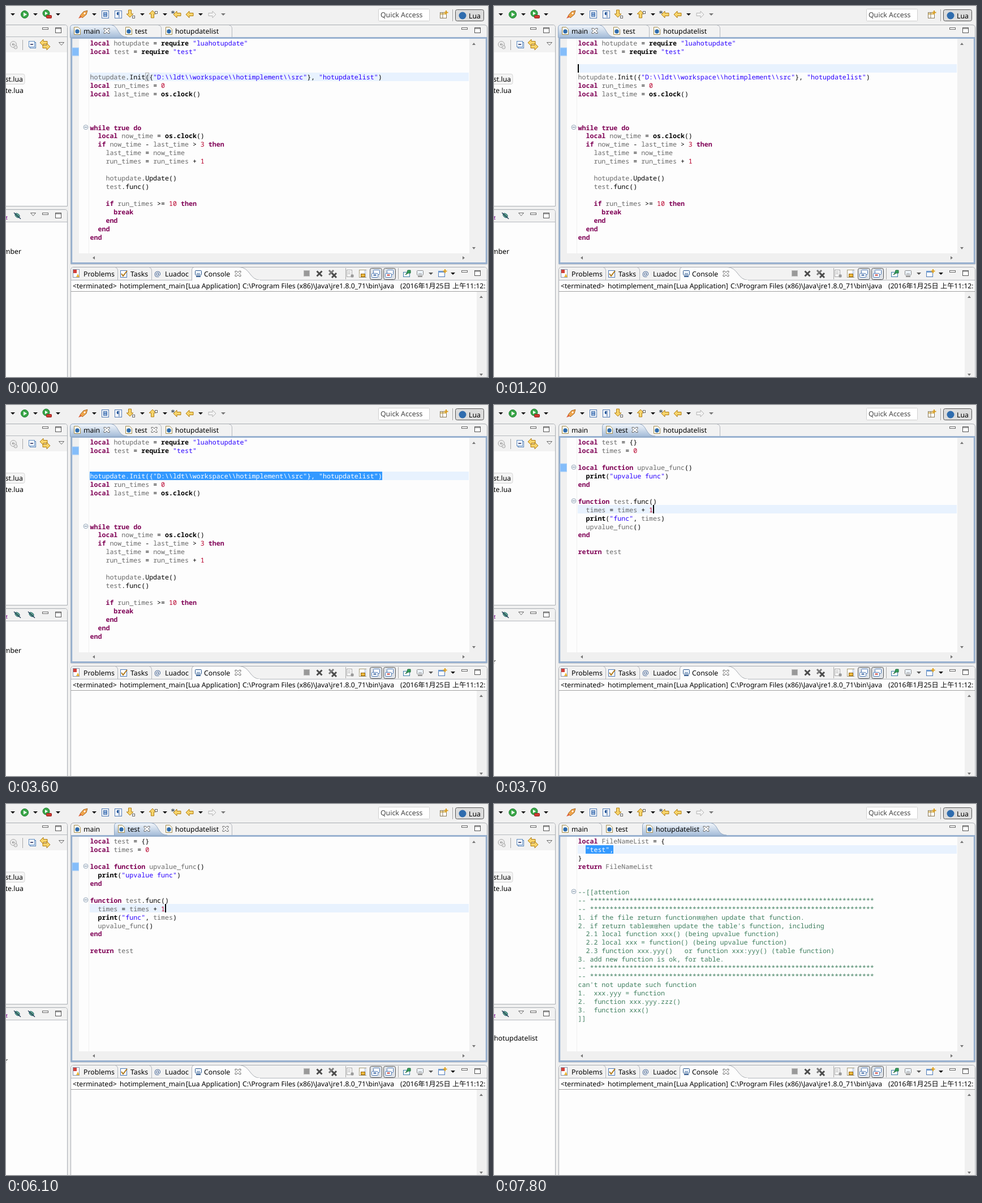
These frames come from a looping animation (852 px wide and 657 px high, 8 s). An HTML page:

```html
<!DOCTYPE html>
<html lang="en">
<head>
<meta charset="utf-8">
<title>Editor tabs</title>
<style>
html, body { margin: 0; width: 100%; height: 100%; overflow: hidden; background: #f0f0f0; }
svg { display: block; }
text { white-space: pre; text-rendering: geometricPrecision; }
.ui { font: 12.3px "Noto Sans", "Noto Sans CJK SC", "Open Sans", sans-serif; fill: #000; }
.code { font: 11.633px "Noto Sans Mono", "DejaVu Sans Mono", monospace; fill: #000; }
.cjk { font-size: 8.3px; font-family: "Noto Sans CJK SC", "Noto Sans CJK", sans-serif; }
.k { fill: #7f0055; font-weight: bold; }
.b { font-weight: bold; }
.s { fill: #2a00ff; }
.n { fill: #b8002c; }
.v { fill: #6a6a6a; }
.c { fill: #3f7f5f; }
.sel, .sel tspan { fill: #fff; }
</style>
</head>
<body>
<svg id="stage" width="852" height="657" viewBox="0 0 852 657"></svg>
<script>
const LOOP = 8000, X0 = 148.5, CW = 6.98, LH = 14.95;
const BAR = '#f2f2f2', EDGE = '#a9adb3', SOFT = '#b4b8be';
const lineY = n => 58.2 + LH * n;
const colX = col => X0 + CW * col;
const esc = s => s.replace(/&/g, '&amp;').replace(/</g, '&lt;').replace(/>/g, '&gt;');

// shape helpers
const rect = (x, y, w, h, fill = 'none', stroke = 'none', r = 0, sw = 1) =>
  `<rect x="${x}" y="${y}" width="${w}" height="${h}" rx="${r}" fill="${fill}" stroke="${stroke}" stroke-width="${sw}"/>`;
const path = (d, fill = 'none', stroke = 'none', sw = 1) =>
  `<path d="${d}" fill="${fill}" stroke="${stroke}" stroke-width="${sw}"/>`;
const disc = (x, y, r, fill, stroke = 'none') =>
  `<circle cx="${x}" cy="${y}" r="${r}" fill="${fill}" stroke="${stroke}"/>`;
const label = (x, y, s, extra = '') => `<text class="ui" x="${x}" y="${y}" ${extra}>${esc(s)}</text>`;
const line = (x1, y1, x2, y2, c, sw = 1) => path(`M${x1} ${y1}L${x2} ${y2}`, 'none', c, sw);

// small icons, placed by centre
const drop = (x, y, c = '#111') => path(`M${x - 4} ${y - 2}h8l-4 4z`, c);
const scrollArrow = (x, y, turn) =>
  `<path d="M-3 2h6l-3 -4z" fill="#777" transform="translate(${x} ${y}) rotate(${turn})"/>`;
const minMax = (x, y) => rect(x - 4.5, y - 4.5, 10, 3, '#fff', '#666') +
  rect(x + 18.5, y - 4.5, 10, 9, '#fff', '#555') + line(x + 18, y - 3, x + 29, y - 3, '#555');
const viewMenu = (x, y) => path(`M${x - 4.5} ${y - 2.5}h9l-4.5 5z`, '#fff', '#666');
const closeX = (x, y) => path(`M${x - 5} ${y - 4.5}h3l2 2.5 2 -2.5h3v2l-2.5 2.5 2.5 2.5v2h-3l-2 -2.5 -2 2.5h-3v-2l2.5 -2.5 -2.5 -2.5z`, '#fff', '#666');
const file = (x, y) => path(`M${x - 5.5} ${y - 6.5}h7l4 4v9h-11z`, '#fffdf2', '#a08a4c') +
  disc(x, y + 1, 3.7, '#2f6cae');
const arrow = (x, y, turn, fill = '#f7d46b', stroke = '#b07c12') =>
  `<path d="M-7 0l6 -6v3.5h7v5h-7v3.5z" fill="${fill}" stroke="${stroke}" transform="translate(${x} ${y}) rotate(${turn})"/>`;
const slashed = (x, y) => `<ellipse cx="${x}" cy="${y}" rx="4.5" ry="3" fill="#63a58c" stroke="#286a70" transform="rotate(40 ${x} ${y})"/>` +
  line(x - 6, y - 5, x + 6, y + 6, '#1c3550', 1.3);
const cross = (x, y, r, c) => path(`M${x - r} ${y - r}l${2 * r} ${2 * r}M${x + r} ${y - r}l${-2 * r} ${2 * r}`, 'none', c, 3);
const monitor = (x, y, c) => rect(x - 5.5, y - 5.5, 11, 8, '#eef5fc', c, 1) + line(x - 3, y, x + 3, y, c) +
  line(x - 4, y + 5, x + 4, y + 5, c, 2);
const fold = n => disc(141, lineY(n) + 7, 4, '#f4f7fa', '#9aaabb') +
  line(138.5, lineY(n) + 7, 143.5, lineY(n) + 7, '#6b7f95');
const grip = (x, y) => line(x, y, x, y + 20, '#a9a9a9');

function mainBar() {
  let s = rect(0, 0, 852, 32, '#f1f1f1');
  [12, 52, 92, 156, 241, 281, 344].forEach(x => s += drop(x, 15));
  s += drop(384, 15, '#777');
  s += disc(33, 15, 6.5, '#3aa648', '#187a2c') + path('M31 11.5l6 3.5 -6 3.5z', '#fff');
  s += disc(71, 13, 6, '#3aa648', '#187a2c') + path('M69 10l5 3 -5 3z', '#fff') +
    rect(71.5, 16.5, 9, 5, '#cf3b32', '#8d1f1f', 1);
  s += path('M144 8l-7 2 -6 7 4 4 7 -6z', '#f0a44a', '#a86a28') + path('M131 17l-3 5 6 -2z', '#e0603a') + disc(139, 13, 1.5, '#fff');
  s += rect(169.5, 8.5, 12, 13, '#fff', '#4d78b4') + rect(172.5, 11.5, 6, 7, '#b9d0ee', '#3263a4') +
    line(173, 14, 178, 14, '#3263a4') + line(173, 16, 178, 16, '#3263a4');
  s += rect(192.5, 8.5, 12, 13, '#fff', '#4d78b4') + label(195, 19, '¶', 'style="fill:#2a5a9c;font-size:11px"');
  s += arrow(219, 13, -90) + rect(223.5, 17.5, 4, 4, '#fff', '#666');
  s += arrow(259, 15, 90) + rect(263.5, 9.5, 4, 4, '#fff', '#666');
  s += arrow(303, 15, 0) + path('M295 8v6M292 9.5l6 3M298 9.5l-6 3', 'none', '#345');
  s += arrow(325, 15, 0) + arrow(364, 15, 180, '#f2f2f2', '#b5b5b5');
  s += rect(658.5, 5.5, 90, 21, '#fff', '#d0d0d0', 1) + label(662, 20, 'Quick Access', 'style="fill:#444"');
  s += rect(767.5, 11.5, 11, 10, '#fff', '#8a7a58') + line(768, 14, 779, 14, '#d7b65a', 2) + line(772, 12, 772, 22, '#8a7a58') +
    path('M778 8v7M774.5 11.5h7', 'none', '#d79a1c', 2);
  s += line(789.5, 6, 789.5, 27, '#a5a5a5');
  s += rect(794.5, 6.5, 50, 20, '#dcdcdc', '#555', 3) + disc(807, 17, 6.5, '#2f6cae') + label(818, 22, 'Lua');
  return s;
}

function leftViews() {
  const panel = (y, h, bar) => path(`M-5 ${y + .5}H104q4.5 0 4.5 5V${y + h + .5}H-5z`, '#fdfdfd', EDGE) +
    path(`M-5 ${y + 1}H104q4 0 4 5V${y + bar}H-5z`, BAR) + line(0, y + bar + .5, 108, y + bar + .5, SOFT);
  let s = panel(33, 321, 21) + rect(0, 55, 108, 27, BAR) + minMax(69, 43);
  s += disc(13, 68, 5.5, '#ededed', '#aaa') + path('M16 68h-5l2 -2M11 68l2 2', 'none', '#888') + disc(17, 73, 3, '#e4e4e4', '#aaa');
  s += line(29.5, 60, 29.5, 78, '#a9a9a9');
  s += rect(42.5, 64.5, 10, 10, '#fff', '#4d7db8') + rect(40.5, 62.5, 10, 10, '#f5faff', '#5c8ac0') + line(43, 68, 48, 68, '#225', 1.5);
  s += arrow(67, 65, 0) + arrow(71, 72, 180) + viewMenu(98, 67);
  s += rect(-5, 120.5, 38, 18, '#f5f5f5', '#d5d5d5', 3) + label(30, 134, 'st.lua', 'text-anchor="end"') +
    label(31, 154, 'te.lua', 'text-anchor="end"');
  s += panel(360, 300, 22) + minMax(69, 371);
  s += label(-2, 378, 'z', 'style="fill:#8a2a9a;font-weight:bold;font-size:10px"') + slashed(20, 371);
  return s;
}

function editorFrame() {
  return path('M114.5 457V39q0 -5.5 5.5 -5.5H845q5.5 0 5.5 5.5V457z', BAR, EDGE) +
    rect(116, 56.5, 733, 399, '#fdfdfd', '#98b1d0', 0, 3) +
    rect(117.5, 58, 11.5, 396, '#f0f0f0') + rect(129, 438, 718, 16, '#f0f0f0') +
    rect(819, 58, 28.5, 396, '#f0f0f0') + line(146.5, 58, 146.5, 438, '#f0f0f0') +
    scrollArrow(827, 67, 0) + scrollArrow(827, 429, 180) + scrollArrow(155, 446, -90) + scrollArrow(809, 446, 90) +
    minMax(810, 43);
}

function consoleView() {
  const y = 474;
  let s = path('M114.5 657V468q0 -5.5 5.5 -5.5H845q5.5 0 5.5 5.5V657', '#fdfdfd', EDGE) +
    path('M115 485V468q0 -5 5 -5H845q5 0 5 5V485z', BAR) + line(115, 485.5, 850, 485.5, SOFT);
  s += path('M328.5 486V468q0 -5.5 5 -5.5H412C432 462.5 430 485.5 450 485.5z', '#fdfdfd', EDGE) + line(329, 486, 449, 486, '#fdfdfd', 2);
  [197.5, 257.5].forEach(x => s += path(`M${x - 4} 463q4 1 4 5V485`, 'none', SOFT));
  s += rect(118.5, 466.5, 11, 14, '#fff', '#8896ae') + rect(119, 467, 6, 6, '#d2413a') + path('M124 480l3 -6 3 6z', '#f0b93a');
  s += rect(202.5, 468.5, 11, 12, '#fff', '#4d78b4') + path('M204 474l3 4 7 -9', 'none', '#b07a1c', 2);
  s += label(262, 479, '@', 'style="fill:#3d5f92;font-size:13px"') + monitor(340, y, '#2c568c') + closeX(410, y);
  [[137, 'Problems'], [220, 'Tasks'], [281, 'Luadoc'], [350, 'Console']].forEach(([x, t]) => s += label(x, 479, t));

  s += rect(526.5, 468.5, 10, 10, '#999', '#bdbdbd') + cross(554, y, 4.5, '#4b4b4b') +
    cross(575, y - 2, 4, '#777') + cross(580, y + 3, 4, '#4b4b4b') + grip(600.5, 464);
  s += rect(602.5, 467.5, 9, 12, '#f7f7f7', '#aaa') + line(604, 471, 609, 471, '#aaa') + line(604, 474, 609, 474, '#aaa') + cross(612, 478, 2, '#999');
  s += rect(624.5, 467.5, 12, 13, '#fff', '#a59b78') + rect(633, 468, 4, 12, '#d5dfee') + rect(627.5, 474.5, 7, 5, '#efb93c', '#94640e');
  [[643.5, '#2c5a9c'], [667.5, '#c8342e']].forEach(([x, c]) =>
    s += rect(x, 464.5, 21, 20, '#dfe3e8', '#555', 3) + rect(x + 6, 467.5, 11, 8, '#fff', '#4d78b4', 1) +
      rect(x + 3, 473.5, 11, 7, '#fff', '#4d78b4', 1) + line(x + 6, 476.5, x + 11, 476.5, c, 2));
  s += grip(693.5, 464);
  s += rect(702.5, 471.5, 11, 8, '#fff', '#3f7fa8') + path('M706 476l3 -4 1 -4h5v5h-4z', '#35a05a', '#1c6b3c');
  s += monitor(732, y, '#8a8a8a') + drop(751, y, '#555');
  s += rect(764.5, 469.5, 11, 10, '#fff', '#4d78b4') + rect(764, 469, 12, 3, '#6e9ad0') + path('M776 466v7M772.5 469.5h7', 'none', '#e0a01c', 2);
  s += drop(790, y) + minMax(810, 473);

  [[118, '<terminated>'], [201, 'hotimplement_main'], [318, '[Lua Application]'],
   [418, String.raw`C:\Program Files (x86)\Java\jre1.8.0_71\bin\java`], [697, '(2016年1月25日'], [789, '上午11:12:']]
    .forEach(([x, t]) => s += label(x, 500, t, 'style="font-size:12.15px"'));
  s += line(115, 505.5, 850, 505.5, '#a0a0a0') + rect(832, 506, 17, 151, '#f0f0f0') +
    scrollArrow(840, 515, 0) + scrollArrow(840, 653, 180);
  return s;
}

const stars = '-- ' + '*'.repeat(72);
const pages = [
  { name: 'main', mark: 1, folds: [10], outline: ['mber', 27, 439, 'end'], src: String.raw`local hotupdate = require "luahotupdate"
local test = require "test"


hotupdate.Init({"D:\\ldt\\workspace\\hotimplement\\src"}, "hotupdatelist")
local run_times = 0
local last_time = os.clock()



while true do
  local now_time = os.clock()
  if now_time - last_time > 3 then
    last_time = now_time
    run_times = run_times + 1

    hotupdate.Update()
    test.func()

    if run_times >= 10 then
      break
    end
  end
end` },
  { name: 'test', mark: 3, folds: [3, 7], outline: ['r', 3, 459, 'end'], src: `local test = {}
local times = 0

local function upvalue_func()
  print("upvalue func")
end

function test.func()
  times = times + 1
  print("func", times)
  upvalue_func()
end

return test` },
  { name: 'hotupdatelist', folds: [6], outline: ['hotupdatelist', 0, 419, 'start'], src: `local FileNameList = {
  "test",
}
return FileNameList


--[[attention
${stars}
${stars}
1. if the file return function锛宼hen update that function.
2. if return table锛宼hen update the table's function, including
  2.1 local function xxx() (being upvalue function)
  2.2 local xxx = function() (being upvalue function)
  2.3 function xxx.yyy()   or function xxx:yyy() (table function)
3. add new function is ok, for table.
${stars}
${stars}
can't not update such function
1.  xxx.yyy = function
2.  function xxx.yyy.zzz()
3.  function xxx()
]]` }
];

const keywords = /^(local|while|true|do|if|then|break|end|function|return)$/;
const globals = /^(require|os|clock|print)$/;
const span = (cls, s) => `<tspan class="${cls}">${esc(s)}</tspan>`;

function paint(s) {
  return s.replace(/"[^"]*"|\.?[A-Za-z_]\w*|\d+|[^"\w.]+|./g, tok => {
    if (tok[0] === '"') return span('s', tok);
    if (/^\d/.test(tok)) return span('n', tok);
    if (keywords.test(tok)) return span('k', tok);
    if (globals.test(tok.replace('.', ''))) return span('b', tok);
    return /^[A-Za-z_]/.test(tok) ? span('v', tok) : esc(tok);
  });
}
const codeLine = (inner, n, cls = '') => `<text class="code ${cls}" x="${X0}" y="${lineY(n) + 11.8}">${inner}</text>`;

function pageBody(p) {
  let comment = false;
  p.lines = p.src.split('\n').map(s => {
    comment = comment || s.startsWith('--[[');
    return comment ? span('c', s).replace(/锛宼/, '<tspan class="cjk">$&</tspan>') : paint(s);
  });
  const [text, x, y, anchor] = p.outline;
  return (p.mark ? rect(117, Math.ceil(lineY(p.mark)), 11.5, 14, '#84bdfa', '#a9d0f8') : '') +
    p.folds.map(fold).join('') + p.lines.map((l, n) => codeLine(l, n)).join('') +
    label(x, y, text, `text-anchor="${anchor}"`);
}

// left edge of each tab, for each active page
const tabX = [[117, 208, 279], [117, 195, 279], [117, 195, 266]];
const nameW = [29, 22, 77];

function tabs(active, hover) {
  let back = '', front = '', current = '';
  pages.forEach((p, i) => {
    const x = tabX[active][i], end = x + 20 + nameW[i] + 12;
    if (i === active) {
      current = path(`M${x - 3.5} 56V39q0 -5.5 5 -5.5H${end + 6}C${end + 22} 33.5 ${end + 18} 55 ${end + 36} 55V56z`, 'url(#tab)', '#8fa6c2');
    } else if (i !== active - 1) {
      const edge = i === 2 ? 399.5 : end + 12.5;
      back += path(`M${edge - 5} 34q5 1 5 6V55`, 'none', SOFT);
    }
    if (i === active || i === hover) front += closeX(end, 44);
    front += file(x + 9, 44) + label(x + 20, 49, p.name);
  });
  return back + current + front;
}

const stage = document.getElementById('stage');
stage.innerHTML = `<defs><linearGradient id="tab" x2="0" y2="1">
  <stop stop-color="#f3f7fb"/><stop offset="1" stop-color="#a3bbd8"/></linearGradient></defs>` +
  rect(0, 0, 852, 657, '#f0f0f0') + mainBar() + leftViews() + editorFrame() + consoleView() +
  '<g id="tabs"></g><g id="tools"></g><g id="under"></g>' +
  pages.map((p, i) => `<g id="page${i}">${pageBody(p)}</g>`).join('') + '<g id="cursor"></g>';
const el = id => document.getElementById(id);

// time, line, caret column, anchor column
const moves = [
  [0, 4, 15, 15], [500, 4, 0, 0], [600, 4, 8, 0], [700, 4, 22, 0], [800, 4, 38, 0], [900, 4, 54, 0],
  [1000, 4, 66, 0], [1100, 4, 74, 0], [1200, 3, 0, 0], [1500, 4, 74, 0], [3700, 8, 19, 19],
  [6200, 1, 9, 9], [7000, 1, 7, 9], [7100, 1, 5, 9], [7200, 1, 3, 9], [7400, 1, 2, 9]
];
const caretOff = [[0, 500], [1900, 2300], [2600, 3000], [3400, 3700], [4000, 4400],
  [4800, 5200], [5500, 5900], [6500, 6900], [7800, 8000]];
const within = (t, a, b) => t >= a && t < b;

function stateAt(t) {
  return {
    active: t < 3700 ? 0 : t < 6200 ? 1 : 2,
    hover: within(t, 3100, 3700) ? 1 : within(t, 5600, 6200) ? 2 : -1,
    swap: within(t, 3600, 3700) || within(t, 6100, 6200),
    move: moves.filter(m => m[0] <= t).pop(),
    caret: !caretOff.some(([a, b]) => within(t, a, b)),
    bracket: t < 500
  };
}

function draw(s) {
  const [, n, col, anchor] = s.move, y = Math.floor(lineY(n));
  el('tabs').innerHTML = tabs(s.active, s.hover);
  el('tools').innerHTML = s.swap ? slashed(45, 371) : viewMenu(48, 369);
  el('under').innerHTML = rect(148, y, 670, 15, '#e8f2fe') +
    (s.bracket ? rect(246.5, y + .5, 6, 14, 'none', '#a8a8a8') : '');
  pages.forEach((p, i) => el('page' + i).style.display = i === s.active ? '' : 'none');
  const x1 = Math.floor(colX(Math.min(col, anchor))), x2 = Math.floor(colX(Math.max(col, anchor)));
  const sel = x2 > x1 ? `<svg x="${x1}" y="${y}" width="${x2 - x1}" height="15" viewBox="${x1} ${y} ${x2 - x1} 15">` +
    rect(x1, y, x2 - x1, 15, '#3399ff') + codeLine(pages[s.active].lines[n], n, 'sel') + '</svg>' : '';
  el('cursor').innerHTML = sel + (s.caret ? rect(Math.floor(colX(col)), y, 2, 15, '#000') : '');
}

const start = performance.now();
let last = '';
function tick() {
  const s = stateAt((performance.now() - start) % LOOP), key = JSON.stringify(s);
  if (key !== last) draw(s);
  last = key;
  requestAnimationFrame(tick);
}
tick();
</script>
</body>
</html>
```
